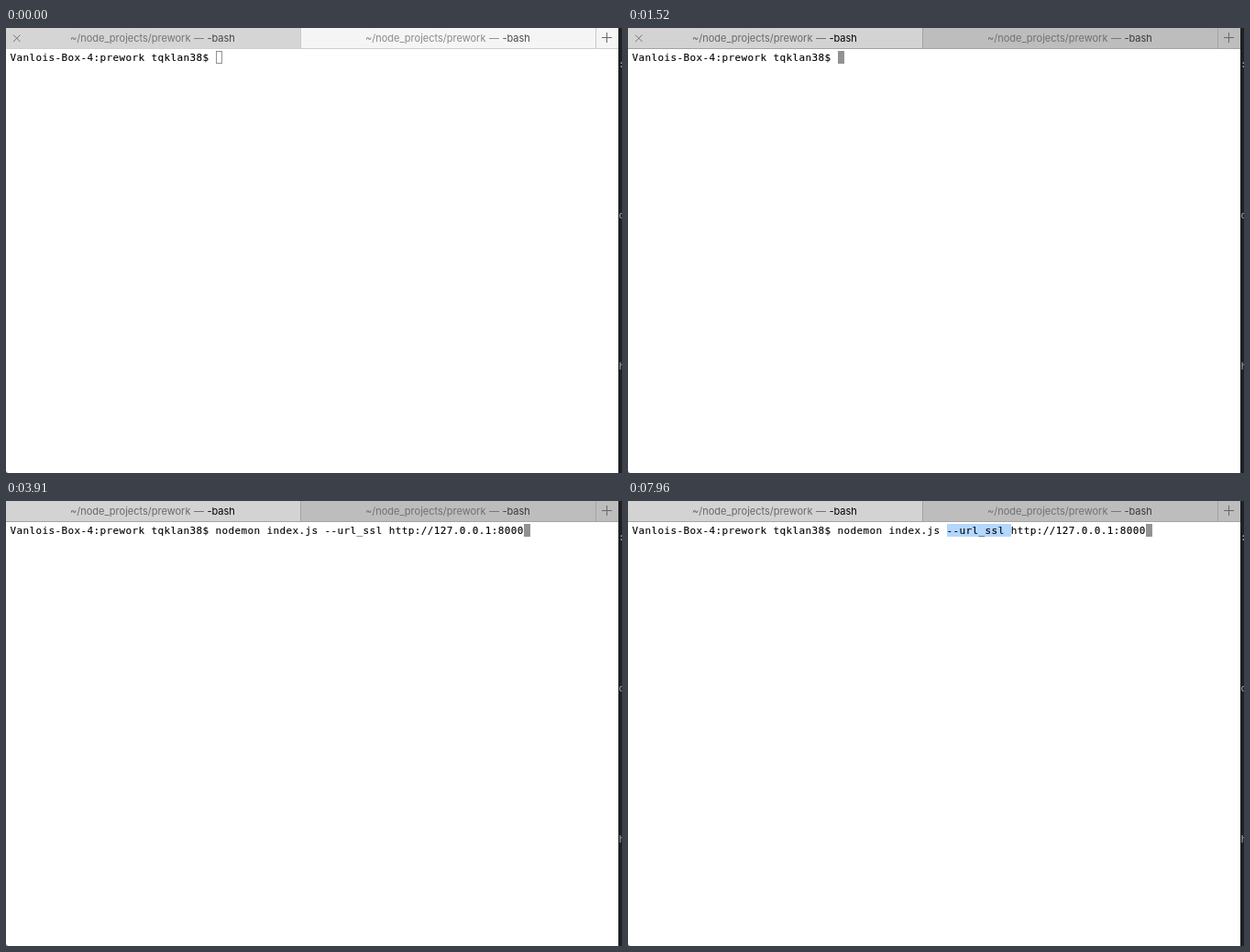
Write an HTML page that moves like this. It is 672 px wide and 486 px high and loops after 8000 ms.

```html
<!DOCTYPE html>
<html lang="en">
<head>
<meta charset="utf-8">
<title>Terminal session</title>
<style>
  html, body { margin: 0; width: 100%; height: 100%; overflow: hidden; background: #fff; }
  svg { display: block; width: 672px; height: 486px; }
  .title { font: 11px Inter, sans-serif; fill: var(--path); }
  .title .job { fill: var(--job); }
  .line { font: 11px "DejaVu Sans Mono", monospace; letter-spacing: 0.378px; white-space: pre;
          fill: #000; stroke: #000; stroke-width: 0.1px; }
  .behind { font: 11px "DejaVu Sans Mono", monospace; fill: #a9abb0; }
  #bar { --left: #d5d5d5; --right: #f5f5f5; --edge: #c9c9c9; --rim: #cfcfcf; }
  #t1 { --path: #747474; --job: #444; }
  #t2 { --path: #8a8a8a; --job: #4a4a4a; }
  .active #bar { --left: #d3d3d3; --right: #bdbdbd; --edge: #a3a3a3; --rim: #a3a3a3; }
  .active #t1 { --path: #686868; --job: #000; }
  .active #t2 { --path: #707070; --job: #383838; }
</style>
</head>
<body>
<svg id="stage" viewBox="0 0 672 486">
  <rect width="672" height="486" fill="#fff"/>
  <g id="bar">
    <rect width="322" height="22" style="fill:var(--left)"/>
    <rect x="322" width="346" height="22" style="fill:var(--right)"/>
    <path d="M321.5 0V22M643.5 0V22" style="stroke:var(--edge)"/>
    <path d="M0 22.5H668" style="stroke:var(--rim)"/>
    <path id="close" d="M8 7.5L15.5 15M15.5 7.5L8 15" stroke="#777"/>
    <path d="M650 10.5H661M655.5 5V16" stroke="#686868"/>
  </g>
  <g id="titles"></g>
  <rect id="select" x="348" y="25" height="14" fill="#b3d7ff"/>
  <rect id="cursor" y="25" height="14"/>
  <text id="line" class="line" x="4.6" y="36"></text>
  <rect x="668" width="4" height="486" fill="#202124"/>
  <g class="behind">
    <text x="668" y="43">:</text>
    <text x="668.5" y="208">d</text>
    <text x="668.5" y="373">h</text>
  </g>
  <path d="M0 484L2 486H0Z" fill="#888"/>
</svg>
<script>
const LOOP = 8000, CELL = 7, LEFT = 5;
const PROMPT = "Vanlois-Box-4:prework tqklan38$ ";
const FOCUS = 1400, HOVER_END = 2900;
const HISTORY = [
  [0, ""],
  [2160, "clear"],
  [2840, "nodemon index.js --url_ssl http://127.0.0.1:8000"],
];
const DRAG = { start: 7430, end: 7920, cells: 10 };

const $ = id => document.getElementById(id);

$("titles").innerHTML = [70, 392].map((x, i) =>
  `<text id="t${i + 1}" class="title" x="${x}" y="15">~/node_projects/prework` +
  `<tspan x="${x + 135}">—</tspan><tspan class="job" x="${x + 149.4}">-bash</tspan></text>`
).join("");

function setAttrs(el, attrs) {
  for (const key in attrs) el.setAttribute(key, attrs[key]);
}

function draw(t) {
  const active = t >= FOCUS;
  const command = HISTORY.findLast(([at]) => t >= at)[1];
  const text = PROMPT + command;
  const x = LEFT + text.length * CELL;

  $("stage").classList.toggle("active", active);
  $("close").setAttribute("visibility", t < HOVER_END ? "visible" : "hidden");
  if ($("line").textContent !== text) $("line").textContent = text;

  setAttrs($("cursor"), active
    ? { x, y: 25, width: CELL, height: 14, fill: "#929292", stroke: "none" }
    : { x: x + 0.5, y: 25.5, width: 6, height: 13, fill: "none", stroke: "#929292" });

  const p = Math.min(1, Math.max(0, (t - DRAG.start) / (DRAG.end - DRAG.start)));
  $("select").setAttribute("width", Math.ceil(p * DRAG.cells) * CELL);
}

const began = performance.now();
function tick() {
  draw((performance.now() - began) % LOOP);
  requestAnimationFrame(tick);
}
draw(0);
requestAnimationFrame(tick);
</script>
</body>
</html>
```
